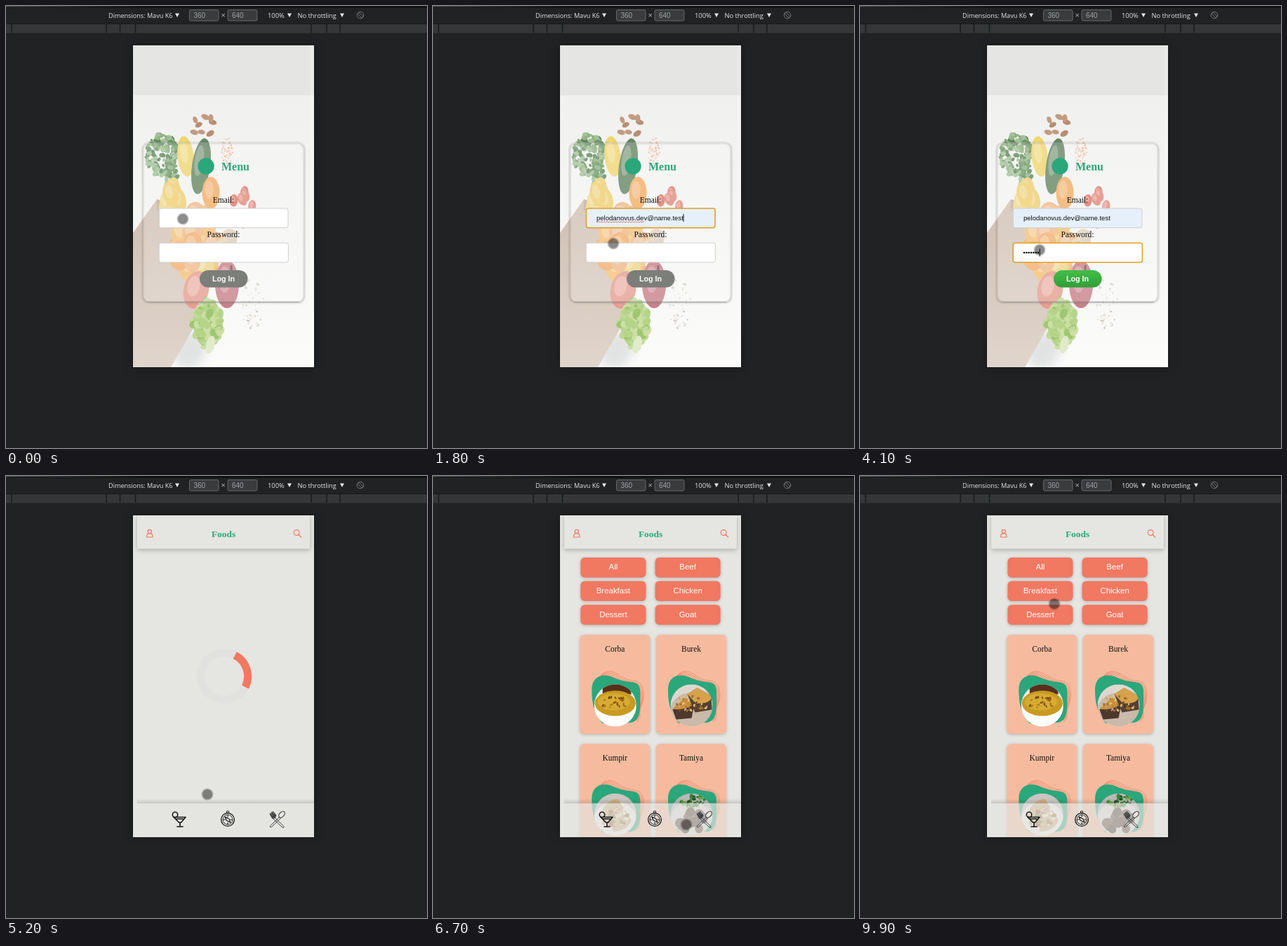
Write an HTML page that moves like this. It is 600 px wide and 629 px high and loops after 10 s.

```html
<!DOCTYPE html>
<html lang="en">
<head>
<meta charset="utf-8">
<title>Menu app</title>
<style>
  html, body { margin: 0; width: 100%; height: 100%; overflow: hidden; background: #202223; }
  svg { display: block; width: 100vw; height: 100vh; }
  .ui { font-family: "Open Sans", sans-serif; }
  .sans { font-family: "Liberation Sans", Arial, sans-serif; }
  .serif { font-family: "Liberation Serif", "Times New Roman", serif; }
  .mid { text-anchor: middle; }
  .soft { filter: drop-shadow(0 1px 2px rgba(0, 0, 0, .22)); }
  .bar { filter: drop-shadow(0 2px 3px rgba(0, 0, 0, .25)); }
  .glow { filter: drop-shadow(0 0 7px rgba(0, 0, 0, .3)); }
  .line { fill: none; stroke-linecap: round; stroke-linejoin: round; }
</style>
</head>
<body>
<svg id="stage" viewBox="0 0 600 629" xmlns="http://www.w3.org/2000/svg"></svg>
<script>
const CORAL = '#f17861', GREEN = '#2ba77c', PAGE = '#e5e5e2', PALE = '#e6e7e8';
const LOOP = 10000, STEP = 100;

let seed = 7;
const rnd = () => (seed = (seed * 16807) % 2147483647) / 2147483647;
const pick = list => list[Math.floor(rnd() * list.length)];
const clamp = (v, lo, hi) => Math.min(hi, Math.max(lo, v));

const rect = (x, y, w, h, fill, r = 0, more = '') =>
  `<rect x="${x}" y="${y}" width="${w}" height="${h}" rx="${r}" fill="${fill}" ${more}/>`;
const oval = (x, y, rx, ry, fill, turn = 0, more = '') =>
  `<ellipse cx="${x}" cy="${y}" rx="${rx}" ry="${ry}" fill="${fill}" transform="rotate(${turn} ${x} ${y})" ${more}/>`;
const ring = (x, y, r, color, width) =>
  `<circle cx="${x}" cy="${y}" r="${r}" fill="none" stroke="${color}" stroke-width="${width}"/>`;
const path = (d, fill, more = '') => `<path d="${d}" fill="${fill}" ${more}/>`;
const line = (d, color, width = 1) =>
  `<path class="line" d="${d}" stroke="${color}" stroke-width="${width}"/>`;
const text = (x, y, s, cls, size, fill = '#111', weight = 400) =>
  `<text x="${x}" y="${y}" class="${cls}" style="font-size:${size}px;font-weight:${weight};fill:${fill}">${s}</text>`;
const many = (n, f) => Array.from({ length: n }, (_, i) => f(i)).join('');

// Random blobs spread over an elliptical area
function scatter(n, x, y, w, h, min, max, colors, flat = .7, draw = oval) {
  return many(n, () => {
    const a = rnd() * 6.283, d = Math.sqrt(rnd()), r = min + rnd() * (max - min);
    return draw(x + Math.cos(a) * d * w, y + Math.sin(a) * d * h, r, r * flat, pick(colors), rnd() * 180);
  });
}

// Upright fruit with a soft highlight
const fruit = (x, y, rx, ry, fill, turn = 0) =>
  oval(x, y, rx, ry, fill, turn) +
  oval(x - rx * .2, y - ry * .2, rx * .5, ry * .55, '#fff', turn, 'opacity=".25"');
const heap = (x, y, rx, ry, fill, turn) => fruit(x, y, rx, ry, fill, turn / 6 - 15);

function toolbar() {
  const arrow = x => path(`M${x} 10.5h6l-3 5.5z`, PALE);
  const box = (x, w, s) => rect(x, 5.5, w, 15.5, '#393b3d', 2, 'stroke="#65686a"') +
    text(x + 6, 17, s, 'sans', 10, '#a0a3a6');
  return rect(0, 0, 600, 2.5, '#0d0e0f') + rect(0, 0, 200, 1.5, 'url(#fade)') +
    rect(0, 25.5, 600, 13, '#343638') + rect(0, 25, 600, 1, '#18191a') +
    [8, 143, 162.5, 184.5, 435, 457, 476].map(x => rect(x - .7, 26, 1.4, 12, '#17191a')).join('') +
    text(146, 16.5, 'Dimensions: Mavu K6', 'ui', 9.1, PALE) + arrow(241) +
    box(261.5, 41.5, '360') + text(306.5, 17, '×', 'ui', 11, '#b5b8ba') + box(316, 42, '640') +
    text(373, 16.5, '100%', 'ui', 9.4, PALE) + arrow(401) +
    text(415.5, 16.5, 'No throttling', 'ui', 9.3, PALE) + arrow(476) +
    ring(505, 13, 4.8, '#85888a', .8) +
    rect(503.5, 9, 3, 8, '#202223', .8, 'stroke="#85888a" stroke-width=".8" transform="rotate(-45 505 13)"');
}

function produce() {
  const leaf = ['#8fb283', '#729a69', '#a4c199', '#5f8a5c'];
  const warm = ['#f3c179', '#f2b070', '#efd58a', '#eebb8c'];
  const red = ['#de776c', '#e28a7c'];
  const husk = ['#ddd9cf', '#cec9bd', '#e8e4db'];
  const lettuce = ['#b5d488', '#9fc670', '#cbe0a4', '#c0d998'];
  return oval(262, 490, 22, 28, '#c9cccd', 30, 'opacity=".5" filter="url(#haze)"') +
    scatter(130, 222, 212, 23, 29, 2, 5, leaf) + scatter(60, 235, 250, 9, 35, 2, 5, leaf) +
    scatter(8, 282, 174, 17, 20, 5, 6.2, ['#c39b81', '#b98d72'], .62) +
    scatter(70, 315, 208, 8, 21, .7, 1.5, ['#f1c6ab', '#eab595']) +
    scatter(60, 351, 425, 17, 37, .7, 1.8, husk) +
    path('M181 323L215 275 282 296 269 455 235 514H181z', 'url(#bag)') +
    path('M215 275l58 21-8 14-50-20z', '#c3afa1') +
    // loose pile spilling out of the bag
    scatter(9, 237, 282, 10, 22, 8, 11, ['#f0d98a', '#eecf72'], 1.7, heap) +
    scatter(24, 272, 340, 30, 46, 12, 16, warm, 1.35, heap) +
    scatter(8, 318, 345, 14, 28, 8, 12, ['#ead2ac', '#dccfc0'], 1.2, heap) +
    scatter(11, 339, 283, 15, 25, 5, 6, red, 1.5, heap) +
    fruit(256, 214, 11.5, 29, '#efd66f', -6) + fruit(278, 228, 13, 40, '#668764', 8) +
    fruit(292, 266, 12.5, 23, '#f2ad66') + fruit(271, 404, 18, 27, '#e69f92', 12) +
    fruit(315, 396, 17, 34, '#c9818a') + line('M321 376v-6', '#74585b', 3) +
    oval(288, 452, 21, 34, '#b9d68f') + scatter(85, 287, 453, 21, 36, 3, 8, lettuce) +
    oval(291, 482, 6, 13, '#e1ebca', 15);
}

function login() {
  return rect(181, 56, 258, 458, 'url(#wall)') + `<g clip-path="url(#phone)">${produce()}</g>` +
    rect(181, 56, 258, 71, '#e5e6e3') + rect(434, 56, 5, 458, '#fff', 0, 'opacity=".15"') +
    rect(195, 195, 230, 227, 'none', 9, 'stroke="#666" stroke-width="1.6" opacity=".45" filter="url(#blur)"') +
    rect(195.5, 194, 229, 226.5, '#f8f8f7', 9, 'fill-opacity=".2"') +
    line('M202 421.3h216', '#8d8e8c', .8) +
    oval(285, 228, 11.7, 11.7, GREEN) + text(307, 233.5, 'Menu', 'serif', 16, GREEN, 700) +
    text(310, 280, 'Email:', 'serif mid', 11.45) + text(310, 329, 'Password:', 'serif mid', 11.45) +
    rect(218.4, 288, 183.6, 27.6, '#fff', 3, 'id="mailBox"') +
    rect(218.2, 337.2, 184.2, 27.6, '#fff', 3, 'id="passBox"') +
    `<g id="mail">${text(233, 305, 'pelodanovus.dev@name.test', 'sans', 9.55)}</g>` +
    `<g id="wave">${line('M233 307.3' + many(17, () => 'q1 1.4 2 0t2 0'), '#e2574c', .8)}</g>` +
    `<g id="dots">${many(7, i => oval(234 + i * 3.34, 351, 1.35, 1.35, '#111'))}</g>` +
    rect(0, 0, 1, 11, '#111', 0, 'id="caret"') +
    rect(276, 376, 68.5, 24.5, '#7c7e7a', 12.2, 'id="submit"') +
    text(310, 391.7, 'Log In', 'sans mid', 10.7, '#fff', 700);
}

// Dish pictures, drawn around 0,0 inside a circle of radius 30
const plate = (back, dish) => rect(-30, -30, 60, 60, back) + oval(0, 6, 30, 24, dish);
const dishes = {
  Corba: () => plate('#eee9e2', '#fff') + path('M-18-30h38l3 14-41 3z', '#58301b') +
    oval(0, -3, 29, 18, '#c99a22') + oval(-2, -5, 23, 12, '#d6ab32') +
    scatter(22, -2, -4, 19, 9, 1.5, 3, ['#8a5617', '#a8741c', '#6f4213'], .5),
  Burek: () => plate('#ded7cf', '#cbb9aa') +
    path('M-27 6l18-17 13 9-4 20-22 2z', '#4d382c') + path('M-27 5l18-16 13 9q-15 10-31 7z', '#c98f3f') +
    path('M-6-16l14-9 20 11 1 20-24 4z', '#54402f') + path('M-6-16l14-9 20 11q2 12-22 11z', '#d8a24d') +
    scatter(34, 1, -2, 25, 14, 1, 2.6, ['#e6bf74', '#a36f33', '#6b4a33', '#b9a08a']),
  Kumpir: () => plate('#c9c5c1', '#efece7') + path('M-22 2q8-24 26-24l19 30q-6 16-26 16z', '#cfae80') +
    scatter(45, -2, 3, 19, 18, 1.5, 4, ['#eee2c7', '#d0ad61', '#88793f', '#f5efe3', '#a35c45']),
  Tamiya: () => plate('#b9b9b5', '#d9d7d2') + scatter(16, -1, 9, 18, 15, 6, 8, ['#4b3327', '#5c4133', '#3f2c22'], .9) +
    scatter(34, 3, -19, 20, 8, 1.5, 4, ['#398238', '#204c25', '#65a54b'])
};

function card(x, y, name) {
  const waves = many(4, i => `<g transform="translate(${-i * 1.5} ${i * 1.9})">` +
    line('M27 63C31 53 40 50 48 53S62 64 74 65 90 71 91 84 83 104 86 118', '#ee7159', .55) + '</g>');
  return `<g transform="translate(${x} ${y})">` + rect(0, 0, 100, 141, '#f6bb9e', 6, 'class="soft"') +
    text(50, 24, name, 'serif mid', 11.45) + waves +
    path('M17 80C16 59 32 54 46 60S66 66 77 68 86 80 86 94 86 123 72 125L32 126C20 111 17 96 17 80z', GREEN) +
    `<g transform="translate(50.5 100.5)" clip-path="url(#disc)">${dishes[name]()}</g></g>`;
}

// Two-column grid
const grid = (list, dx, dy, f) => list.map((s, i) => f(i % 2 * dx, (i >> 1) * dy, s)).join('');

function menu() {
  const names = ['All', 'Beef', 'Breakfast', 'Chicken', 'Dessert', 'Goat'];
  return grid(names, 106.2, 33.6, (x, y, s) => rect(210.3 + x, 116 + y, 93.2, 28.5, CORAL, 6, 'class="soft"') +
      text(256.9 + x, 133.3 + y, s, 'sans mid', 11.45, '#fff')) +
    grid(Object.keys(dishes), 108.7, 155.3, (x, y, s) => card(209.3 + x, 226 + y, s));
}

function footer() {
  const ink = '#171817', grey = '#444';
  return rect(187, 465.5, 252, 48.5, PAGE, 0, 'fill-opacity=".68"') + rect(187, 459, 252, 7, 'url(#lift)') +
    // cocktail
    ring(241, 482, 3.7, ink, 1.6) +
    line('M239 485.5h17l-6.5 7.5h-3zM243 488h9M248 493v6M244 499h8', ink, 1.7) +
    // compass
    ring(316, 489, 9.4, ink, 1.3) + ring(316, 489, 7, ink, .9) + ring(316, 478.3, 1.6, ink, 1.1) +
    line('M316 483v2M316 493v2M310 489h2M320 489h2M312 485l6 3 2 5-6-3z', ink, 1.1) +
    // spoon and fork
    line('M390 485l-14 13.5q0 2 2.5 1l13.5-13', grey) +
    oval(393, 481.8, 3.3, 5.2, PAGE, 45, `stroke="${grey}" stroke-width="1.2"`) +
    line('M381 488l13 12q3 1 2-1.5l-13-12.5', grey) +
    path('M375.5 481l5-4 5 5.5-1.5 4.5-4.5 1z', grey) + line('M376 479l4 4M378 477l4 4', '#999', .7);
}

function foods() {
  return rect(181, 56, 258, 458, PAGE) + `<g clip-path="url(#phone)"><g id="menu">${menu()}</g>` +
    `<g id="spin">${ring(311, 285, 33.6, '#e1e1df', 11)}` +
    `<path d="M287.24 261.24A33.6 33.6 0 0 1 334.76 261.24" fill="none" stroke="${CORAL}" stroke-width="11"/></g>` +
    rect(187, 56, 246, 47.5, PAGE, 0, 'class="bar"') + text(310, 87, 'Foods', 'serif mid', 13.4, GREEN, 700) +
    ring(204.8, 79, 2.7, CORAL, 1.2) + line('M200.5 87q0-4.5 2.5-5.2h3.6q2.5.7 2.5 5.2z', CORAL, 1.2) +
    ring(414.2, 80.5, 3.9, CORAL, 1.2) + line('M417 83.5l3.7 3.5', CORAL, 1.3) + footer() + '</g>';
}

const grad = (id, a, b, flat) => `<linearGradient id="${id}" ${flat ? '' : 'x2="0" y2="1"'}>` +
  `<stop stop-color="${a}"/><stop offset="1" stop-color="${b}"/></linearGradient>`;
const blur = (id, size) => `<filter id="${id}" x="-50%" y="-50%" width="200%" height="200%">` +
  `<feGaussianBlur stdDeviation="${size}"/></filter>`;

document.getElementById('stage').innerHTML = '<defs>' +
  grad('wall', '#eeeeec', '#fbfbfa') + grad('bag', '#d0bfb2', '#e0d5cc') + grad('fade', '#4a4b4c', '#0d0e0f', true) +
  grad('lift', 'rgba(0,0,0,0)', 'rgba(0,0,0,.13)') + grad('go', '#43bd49', '#2f9f38') +
  '<clipPath id="phone"><rect x="181" y="56" width="258" height="458"/></clipPath>' +
  '<clipPath id="disc"><circle r="30"/></clipPath>' + blur('blur', 1.3) + blur('haze', 7) + '</defs>' +
  rect(0, 0, 600, 629, '#202223') + toolbar() +
  rect(181, 56, 258, 458, '#1b1d1e', 0, 'class="glow"') +
  `<g id="login">${login()}</g><g id="foods">${foods()}</g>` +
  `<g id="touch">${oval(0, 0, 8.6, 8.6, '#000', 0, 'opacity=".22"')}${oval(0, 0, 7, 7, '#000', 0, 'opacity=".3"')}</g>`;

const el = id => document.getElementById(id);
const show = (id, on) => el(id).setAttribute('display', on ? 'inline' : 'none');
const set = (id, attrs) => Object.entries(attrs).forEach(([k, v]) => el(id).setAttribute(k, v));

// Pointer moves: leave, arrive, x, y, sideways bow
const moves = [
  [900, 1500, 257, 338, 0], [1800, 2100, 256, 347, 0], [4200, 4800, 305, 390, 0],
  [4900, 5200, 287, 453, 0], [5300, 5800, 316, 366, 0], [6000, 6700, 361, 496, 145],
  [6800, 6900, 389, 192, 0], [7400, 8000, 392, 205, 130], [8000, 8500, 395, 345, -25],
  [8500, 9900, 277, 182, -45]
];

function pointer(t) {
  let x = 252, y = 303;
  for (const [from, to, nx, ny, bow] of moves) {
    const k = clamp((t - from) / (to - from), 0, 1), e = k * k * (3 - 2 * k);
    x += (nx - x) * e + Math.sin(Math.PI * e) * bow;
    y += (ny - y) * e;
  }
  return [x, y];
}

function border(id, focus) {
  set(id, { stroke: focus ? '#dfa02c' : '#cfd0ce', 'stroke-width': focus ? 1.6 : 1 });
}

function draw(t) {
  const inMail = t >= 200 && t < 2000, inPass = t >= 2000, filled = t >= 1200;
  // three slow keystrokes, then four quick ones
  const typed = clamp(Math.floor((t - 2000) / 400), 0, 3) + clamp((t - 3300) / STEP, 0, 4);
  show('login', t < 5000);
  show('foods', t >= 5000);
  border('mailBox', inMail);
  border('passBox', inPass);
  set('mailBox', { fill: filled ? '#e5f0fa' : '#fff' });
  show('mail', filled);
  show('wave', filled && inMail);
  [...el('dots').children].forEach((d, i) => d.setAttribute('display', i < typed ? 'inline' : 'none'));
  show('caret', inMail || inPass);
  set('caret', inMail ? { x: filled ? 356.5 : 233, y: 296 } : { x: 232.3 + typed * 3.34, y: 345.5 });
  set('submit', { fill: typed > 6 ? 'url(#go)' : '#7c7e7a' });
  show('spin', t < 5600);
  show('menu', t >= 5600);
  set('spin', { transform: `rotate(${(t - 5000) * .36} 311 285)` });
  set('touch', { transform: `translate(${pointer(t)})` });
}

const start = performance.now();
function tick(now) {
  const t = Math.max(0, now - start) % LOOP;
  draw(Math.floor(t / STEP) * STEP);
  requestAnimationFrame(tick);
}
draw(0);
requestAnimationFrame(tick);
</script>
</body>
</html>
```
